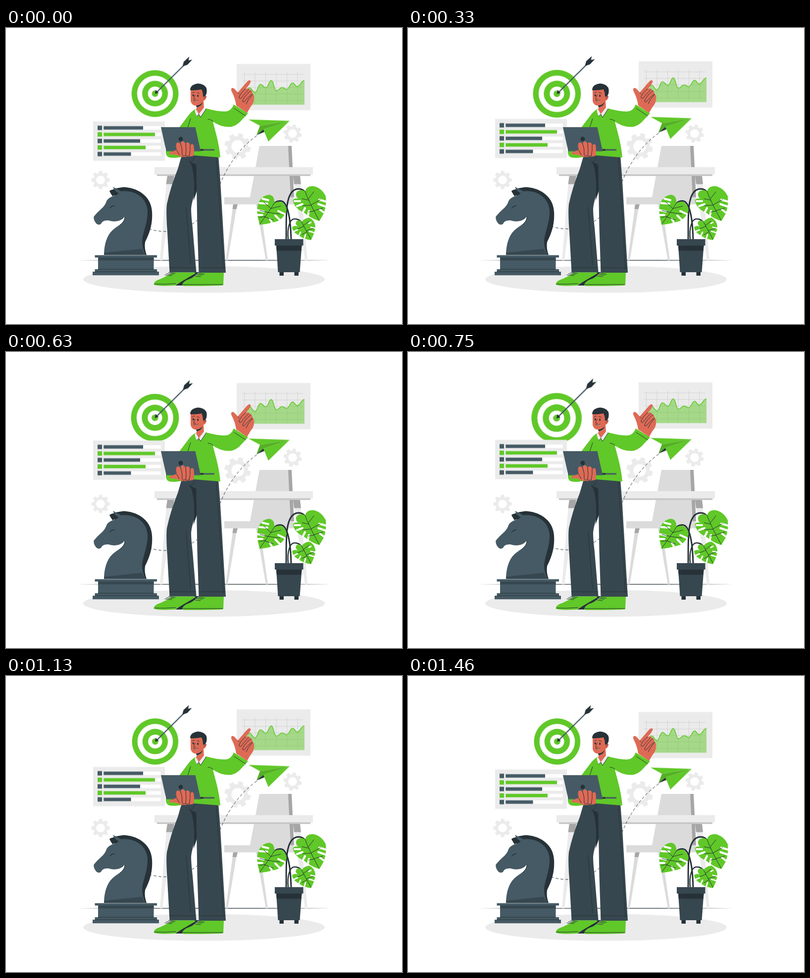
An HTML page for the animation above (1.5 s loop, 800x600 px).

```html
<!DOCTYPE html>
<html lang="en">
<head>
<meta charset="utf-8">
<title>Strategy illustration</title>
<style>
html, body { margin: 0; width: 100%; height: 100%; overflow: hidden; background: #fff; }
svg { display: block; width: 100vw; height: 100vh; }
.green { fill: #60c828; }
.slate { fill: #455a64; }
.deep { fill: #37474f; }
.ink { fill: #263238; }
.skin { fill: #de6a55; }
.pale { fill: #ebebeb; }
.grey { fill: #dbdbdb; }
.mid { fill: #a6a6a6; }
.white { fill: #fff; }
.line { fill: none; stroke: #263238; stroke-width: 1; stroke-linecap: round; stroke-linejoin: round; }
.slit { fill: none; stroke: #fff; stroke-linecap: round; }
#target { transform-origin: 315px 119px; }
</style>
</head>
<body>
<svg viewBox="0 0 800 600" xmlns="http://www.w3.org/2000/svg">
  <ellipse class="pale" cx="400" cy="509.5" rx="244" ry="27.3"/>
  <path class="ink" d="M141 471 Q270 470.2 400 470.2 T658 471 Q530 471.6 400 471.6 T141 471Z"/>
  <g id="gears"></g>

  <!-- chair and desk -->
  <path class="grey" d="M512 239H571L577 343H493Z"/>
  <path class="mid" d="M570 239H577L582 343H575Z"/>
  <path class="grey" d="M441 343H581V357.5H441Z"/>
  <path class="grey" d="M459 357H467L448 471H444Z M505 357H513L529 471H525Z"/>
  <path class="mid" d="M459 357.5H468L465.500 367H457.500Z"/>
  <path class="pale" d="M325 300H338L316 471H311Z M580 300H594L609 471H604Z"/>
  <path class="mid" d="M326 300H340L337 316.500H323.500Z M580 300H594L596 316.500H582Z"/>
  <path class="pale" d="M300 282H620V297H300Z"/>
  <path fill="#c7c7c7" d="M305 296.500H615V300H305Z"/>

  <g id="target">
    <g id="rings"></g>
    <path d="M303 131.500L360 75" stroke="#455a64" stroke-width="2.300"/>
    <path class="ink" d="M301 133.500L302.500 125.500L308.500 131Z M356 78.500L358.500 69L369.500 58.800L368 66.500L375.500 65L366 75Z"/>
  </g>

  <g class="float">
    <path class="pale" d="M466 73.300H615V167H466Z"/>
    <path id="grid" fill="none" stroke="#c7c7c7" stroke-width=".6"/>
    <g id="chart"></g>
  </g>

  <g class="float" id="list">
    <path class="pale" d="M176 189.700H321V269.500H176Z"/>
  </g>

  <g class="float">
    <path class="line" stroke-dasharray="5 5" d="M289 407.500C325 419 362 411 387 389.500C422 358 424 330 444 292C462 259 482 236 508 217.500"/>
    <path class="green" d="M490 185.800L573 188.500L513 198.500Z M573 188.500L530 230.500L520 206Z"/>
    <path fill="#54b024" d="M513 198.500L573 188.500L520 206L506 217.500Z"/>
    <path class="ink" d="M506 217.500L520 206L522 211Z"/>
  </g>

  <!-- chess knight -->
  <path class="ink" d="M209 330L222 325L237 322.500C262 323 293 338 295 372C297 400 288 420 281 434Q279 446 284 460H272L273 440L250 345L222 342Z"/>
  <path class="slate" d="M216 322L233 331C258 328 284 342 286 370C287 393 277 412 275 431Q275 447 282 460H198C198 441 203 421 215 410C226 400 240 396 240 381C235 392 219 394 207 390Q195 389 192 397Q187 401 182 396Q176 388 177.500 382Q184 374 192 367Q199 361 202 354C204 346 211 342 222 339L228 335Q219 331 216 322Z"/>
  <path class="ink" d="M209 331L213 328Q218 334 224 337L215 341Z M208 367Q213 358 221 360Q213 362 208 367Z"/>
  <path class="deep" d="M198 455.500L275 447.500Q277 455 282 460H198Z"/>
  <path class="line" d="M240 381Q241 392 230 400" stroke-width=".8"/>
  <path class="slate" d="M179.500 460.500H305V465.300H179.500Z M186 465H298.500V489H186Z M179.500 489H305V494H179.500Z M175 494H309V501.300H175Z"/>
  <path class="deep" d="M186 465.300H298.500V471H186Z"/>
  <path class="line" d="M186 489H298 M180 494H305" stroke-width=".7"/>

  <!-- plant -->
  <g fill="none" stroke="#263238" stroke-width="3" stroke-linecap="round">
    <path d="M566 428C567 388 561 327 591 326Q600 326 604 333"/>
    <path d="M576 428C575 390 570 350 554 350.500Q545 351 542 356"/>
    <path d="M570 428C568 405 573 386 584 387Q592 387 597 394" stroke-width="2.300"/>
  </g>
  <path class="deep" d="M543 428H600.500V441H543Z M546 441H597.500L593.500 495H549.500Z"/>
  <path class="ink" d="M546 441H597.500L596.800 451.500H546.800Z M552.500 495H561V502H552.500Z M582.500 495H591V502H582.500Z"/>
  <g id="leaves"></g>

  <!-- trousers -->
  <path class="deep" d="M355 258H386L387 322Q375 350 374 367Q374 380 377 405L384.500 495.500H330.500L326 415Q323 372 325 357Q333 320 347 286Z"/>
  <path class="ink" d="M369 270L387 278V326L379 350Q383 302 374 276Z"/>
  <path class="deep" d="M384 258H429L433 310L440 430L444 496H389.500L386.500 405Z"/>
  <path class="line" stroke-width=".8" d="M380 262Q379 271 371 271 M425 264L434 400L439 488 M391 486H443 M364 364L373 480 M331 486H383"/>

  <!-- shoes -->
  <path class="ink" d="M342 522L381 495H390L358 522Z"/>
  <path class="green" d="M298.500 520Q299 514 306 511Q323 505 335 495.500H382.500V497.500L346 519Q344 522 340 522Q305 524 298.500 520Z"/>
  <path class="green" d="M356 521Q357 515 365 511Q380 506 390 496H440L439 521Q436 523 362 523Q356 523 356 521Z"/>
  <path class="line" d="M300 519Q320 520 343 518 M357 520H438"/>
  <path class="line" stroke-width="1.500" d="M321 500.500L335 502M324 498L338 499.500M328 495.500L342 497.500 M378 502L393 504M382 499L397 501M386 496.500L401 499"/>

  <!-- sweater -->
  <path class="green" d="M383 164Q374 169 368 178L349 203L323 248Q322 257 327 261Q332 264 344 263L378 258L433 262.500Q431 240 425 217L418 190C428 196 438 201 453 200.500Q461 200 471 192L489 173L460 155Q456 165 449 168Q438 172 404 163Z"/>
  <path class="line" d="M373 184L367 202 M408 185Q414 185 418 189" stroke-width="1.200"/>
  <path class="line" d="M461 163L484 178"/>

  <!-- pointing hand -->
  <path class="skin" d="M465 157Q463 142 456 129Q453 122 458 121.500Q462 122 468 131C475 123 482 114 489 107Q494 104 494.500 109Q491 117 484 123Q491 121 494 126Q498 128 498 133Q502 136 501 142Q502 151 494 160L487 172Z"/>
  <path class="line" stroke-width="1.100" d="M468 131L471 134 M484 123Q475 130 471 139Q471 146 476 141Q481 134 490 125 M495 127Q484 135 478 147Q478 152 482 149Q488 141 497 134 M498 135Q489 144 485 154"/>

  <!-- head -->
  <path class="skin" d="M384 151L399 144L400 164L389 177L383 165L386 161Z"/>
  <path class="ink" d="M384 157Q393 156 397 150Q396 158 385 161Z"/>
  <path class="pale" d="M383 163L389.500 174.500L400 161L404 164.500L393 181L389.500 175L386 179Q382 174 381.500 167Z"/>
  <path class="line" stroke-width=".8" d="M386 179L389.500 174.500L393 181L404 164.500"/>
  <path class="skin" d="M373 123Q384 121 398 123V137Q404 134 405 140Q403 148 398 147Q396 156 384 157.500Q375 157 373 148Z"/>
  <path class="ink" d="M372 126Q372 118 379 115Q388 110 398 115Q407 119 405.500 130Q405 136 401 139L398 139Q398 130 395 124.500Q383 127 372 126Z"/>
  <path class="line" stroke-width="1.200" d="M376 132Q378 129 381 130 M386 131Q390 131 391 133 M382 136Q378 144 380 145H383"/>
  <path class="line" stroke-width=".8" d="M400 143Q401 139 404 139"/>
  <ellipse class="ink" cx="378.300" cy="136.500" rx="1.500" ry="2.200"/>
  <ellipse class="ink" cx="387.700" cy="137.500" rx="1.500" ry="2.200"/>
  <path class="white" d="M380 147.500Q384 149 388 146.500Q385 151 380 147.500Z"/>
  <path class="line" stroke-width=".8" d="M379 147Q384 150 388 146"/>

  <!-- laptop -->
  <path class="slate" d="M313 201H382.500L393 248.500H323.500Z"/>
  <path class="slate" d="M323.500 248.500H393V245.500H421V248.500H393V250H324Z"/>
  <path class="ink" d="M392 245.500H399V248.800H393Z"/>
  <circle class="ink" cx="353" cy="225" r="4.500"/>
  <path class="skin" d="M330 254Q330 250.500 337 250L345 247Q342 236 345 233Q349 230 353 236Q353 229 357.500 229.500Q362 231 363 236Q364 231 368 232Q372 234 372 238Q376 233 379 237Q381 247 379 259Q368 262.500 351 261Q346 256 333 256Q330 256 330 254Z"/>
  <path class="line" d="M353 235Q357 246 356 257Q359 262 362 258 M363 235Q365 247 363 259Q367 262 370 258 M372 237Q373 248 370 260 M345 248L350 257"/>
</svg>

<script>
const NS = "http://www.w3.org/2000/svg";
const $ = id => document.getElementById(id);

function add(parent, tag, attrs) {
  const el = document.createElementNS(NS, tag);
  for (const key in attrs) el.setAttribute(key, attrs[key]);
  parent.appendChild(el);
  return el;
}

function gear(cx, cy, r, turn) {
  const profile = [[-15, .77], [-10, 1], [10, 1], [15, .77]];
  const points = [];
  for (let tooth = 0; tooth < 8; tooth++) {
    for (const [deg, k] of profile) {
      const a = (tooth * 45 + deg + turn) * Math.PI / 180;
      points.push([cx + r * k * Math.sin(a), cy - r * k * Math.cos(a)]);
    }
  }
  add($("gears"), "polygon", { points: points.join(" "), class: "pale" });
  add($("gears"), "circle", { cx, cy, r: r * .47, class: "white" });
}
gear(468, 240, 27, 15);
gear(579, 214, 18.8, 12);
gear(191, 308, 18.8, 0);

[46.8, 35.8, 25.7, 14.2, 6.4].forEach((r, i) =>
  add($("rings"), "circle", { cx: 301.3, cy: 132.8, r, class: i % 2 ? "white" : "green" }));

// Statistics card
let grid = "";
for (let i = 0; i < 6; i++) grid += `M${481.5 + i * 21.5} 90V155`;
for (let i = 0; i < 5; i++) grid += `M477 ${94.5 + i * 13.2}H601`;
$("grid").setAttribute("d", grid);

// Wave through its peaks and dips, level at each one
const turns = [[482, 127], [492, 121.5], [503, 131], [514, 114.5], [525, 121.5], [536, 106.5],
  [546, 127.5], [558, 121], [567, 124.5], [579, 111.5], [588, 119], [603, 106.5]];
const curve = turns.reduce((d, [x, y], i) => {
  if (!i) return `M${x} ${y}`;
  const [px, py] = turns[i - 1];
  const bend = (x - px) * .45;
  return d + `C${px + bend} ${py} ${x - bend} ${y} ${x} ${y}`;
}, "");
add($("chart"), "path", { d: curve + "V155.800H482Z", class: "green", "fill-opacity": .5 });
add($("chart"), "path", { d: curve, fill: "none", stroke: "#60c828", "stroke-width": 1.6 });

// Ranked bars
[277, 301, 271, 282, 252.5].forEach((end, i) => {
  const y = 199.3 + i * 13.25;
  const fill = i % 2 ? "green" : "slate";
  add($("list"), "rect", { x: 185, y: y - 1, width: 9, height: 9, class: fill });
  add($("list"), "rect", { x: 197.3, y, width: 115.5, height: 7, class: "white" });
  add($("list"), "rect", { x: 197.3, y, width: end - 197.3, height: 7, class: fill });
});

function leaf(shape, veins, slits, width) {
  add($("leaves"), "path", { d: shape, class: "green" });
  add($("leaves"), "path", { d: slits, class: "slit", "stroke-width": width });
  add($("leaves"), "path", { d: veins, class: "line", "stroke-width": .8 });
}
leaf("M604 331Q607 320 620 320.500Q637 323 646 341Q648 359 642 376L633 391.500Q616 386 603 375Q583 366 579.500 350Q581 344 590 346Q582 338 589 331Q596 326 604 331Z",
  "M604 331Q613 355 632 389 M612 349L598 346 M617 359L599 360 M623 371L611 373 M611 346L622 332 M617 358L635 348 M623 370L640 365",
  "M647 352L633 348M646 362L631 357M642 374L634 368M583 351L594 351M588 361L599 357M600 373L604 365M610 380L612 371", 4);
leaf("M542 355Q543 339 531 338Q515 340 509 357Q506 372 509 385L512.500 399Q535 396 550 391Q563 383 567 369Q566 359 557 353Q550 350 542 355Z",
  "M542 355Q531 373 513 397 M535 366L521 353 M530 374L513 370 M524 382L512 384 M535 366L555 361 M530 374L553 377 M523 383L540 389",
  "M512 355L528 356M518 346L530 349M507 369L521 372M508 379L518 379M563 377L550 371M553 389L544 380M537 394L533 387", 4);
leaf("M597 393Q603 385 613 384.500Q623 389 625 401Q625 414 616 430Q602 428 592 421Q578 413 578 404Q581 400 589 402Q582 395 588 391Q593 388 597 393Z",
  "M597 393Q606 410 616 428 M602 402L589 407 M608 413L598 419 M601 400L612 392 M607 411L621 406",
  "M626 406L616 404M623 415L613 412M582 412L589 409M592 420L595 414M603 426L605 419M612 396L616 394", 2.8);

// Motion
const timing = { duration: 1500, delay: -20, iterations: Infinity, easing: "linear" };
const lift = y => ({ transform: `translateY(${y}px)` });
for (const el of document.querySelectorAll(".float")) {
  el.animate([lift(0), lift(-12), lift(0)], timing);
}
const beats = [[0, 1], [.1, 1.1], [.3, 1], [.4, 1], [.5, 1.1], [.6, 1], [1, 1]];
$("target").animate(beats.map(([offset, s]) => ({ offset, transform: `scale(${s})` })), timing);
</script>
</body>
</html>
```
